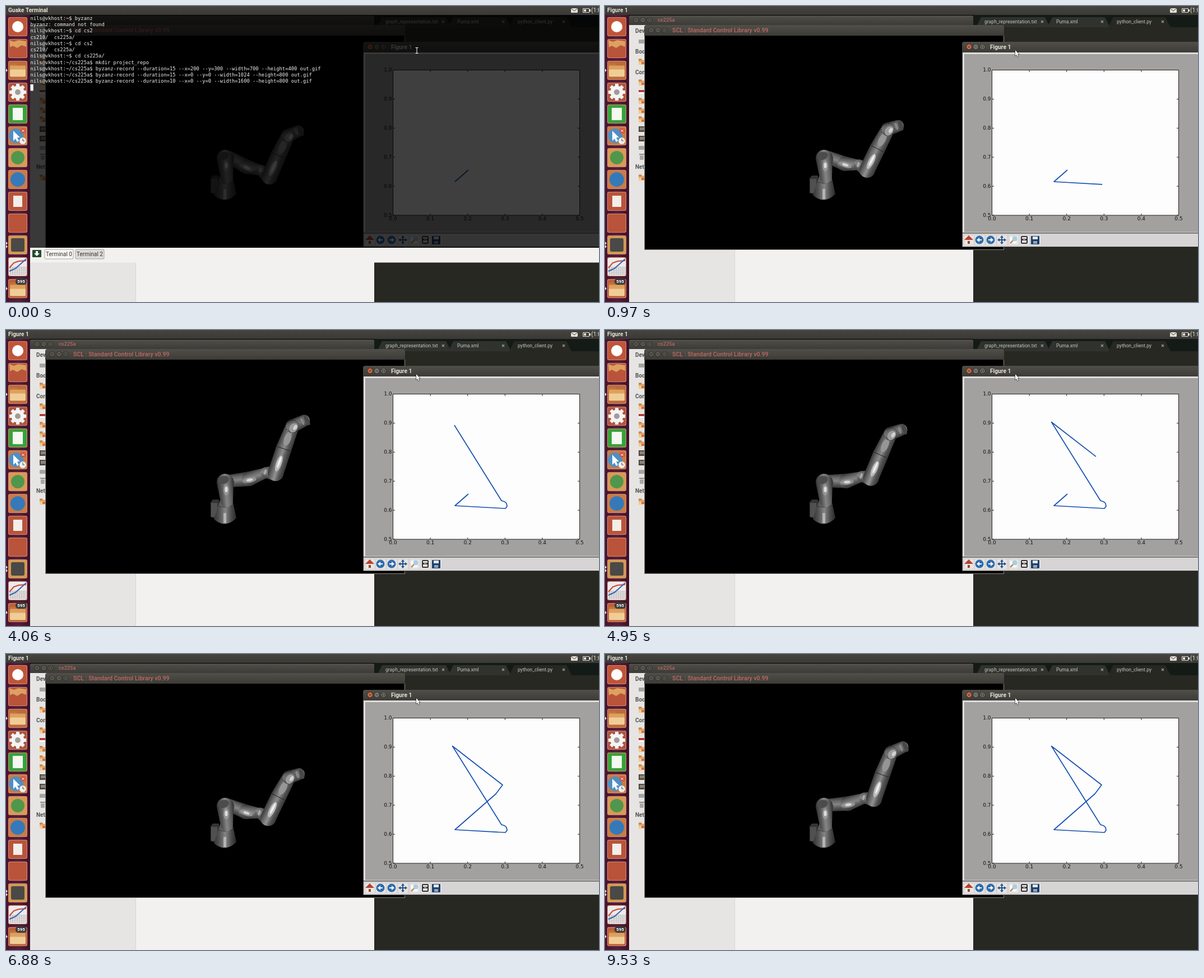
Animation, 1058 px wide and 529 px high, one loop 9630 ms. Source, as an HTML page with a canvas:

```html
<!DOCTYPE html>
<html lang="en">
<head>
<meta charset="utf-8">
<title>Robot arm and plot</title>
<style>
html, body { margin: 0; width: 100%; height: 100%; overflow: hidden; background: #000; }
canvas { display: block; }
</style>
</head>
<body>
<canvas id="stage" width="1058" height="529"></canvas>
<script>
const ctx = document.getElementById('stage').getContext('2d');
const LOOP = 9630, HIDE = 300, LAG = 250;
const UI = 'Roboto, "Open Sans", sans-serif';
const MONO = '8.79px "DejaVu Sans Mono", monospace';
const PLOT = '9px "DejaVu Sans", sans-serif';

// ---- drawing helpers ----
function box(c, x, y, w, h, r = 0) {
  ctx.fillStyle = c;
  ctx.beginPath();
  ctx.roundRect(x, y, w, h, r);
  ctx.fill();
}
function oval(c, x, y, rx, ry = rx, turn = 0) {
  ctx.fillStyle = c;
  ctx.beginPath();
  ctx.ellipse(x, y, rx, ry, turn, 0, 7);
  ctx.fill();
}
function trace(pts) {
  ctx.beginPath();
  pts.forEach(p => ctx.lineTo(p[0], p[1]));
}
function line(c, w, ...pts) {
  trace(pts);
  ctx.strokeStyle = c;
  ctx.lineWidth = w;
  ctx.stroke();
}
function poly(c, ...pts) {
  trace(pts);
  ctx.fillStyle = c;
  ctx.fill();
}
function say(s, x, y, font, c, align = 'left') {
  ctx.font = font;
  ctx.fillStyle = c;
  ctx.textAlign = align;
  ctx.fillText(s, x, y + 0.5);
}
function fade(x1, y1, x2, y2, ...colors) {
  const g = ctx.createLinearGradient(x1, y1, x2, y2);
  colors.forEach((c, i) => g.addColorStop(i / (colors.length - 1), c));
  return g;
}
const mix = (a, b, k) => [a[0] + (b[0] - a[0]) * k, a[1] + (b[1] - a[1]) * k];
const shift = (p, dx, dy) => [p[0] + dx, p[1] + dy];

// ---- motion: each leg eases exponentially towards its goal ----
const A = [825, 293], B = [801, 314], C = [891, 319], D = [884, 305], E = [796.5, 164.5], F = [886, 234];
const hook = [C, [894, 315], [893, 310], [890, 307], D];
const legs = [
  [0, 230, [B, C]], [1080, 500, hook], [3064, 230, [D, E]], [4200, 230, [E, F]],
  [5170, 230, [F, [874, 250], B]], [6180, 230, [B, C]], [7100, 500, hook], [9020, 230, [D, E]]
];
function partial(pts, k) {
  const len = i => Math.hypot(pts[i + 1][0] - pts[i][0], pts[i + 1][1] - pts[i][1]);
  let left = 0;
  for (let i = 0; i < pts.length - 1; i++) left += len(i);
  left *= k;
  const out = [pts[0]];
  for (let i = 0; i < pts.length - 1; i++) {
    const l = len(i);
    if (left <= l) return [...out, mix(pts[i], pts[i + 1], left / l)];
    out.push(pts[i + 1]);
    left -= l;
  }
  return out;
}
function trail(t) {
  const out = [A, B];
  legs.forEach(([start, tau, pts], i) => {
    if (t < start) return;
    const done = legs[i + 1] && t >= legs[i + 1][0];
    out.push(...(done ? pts : partial(pts, 1 - Math.exp((start - t) / tau))));
  });
  return out;
}

// ---- robot ----
function limb([x1, y1], r1, [x2, y2], r2, dark = '#333', light = '#858585') {
  const a = Math.atan2(y2 - y1, x2 - x1), nx = -Math.sin(a), ny = Math.cos(a), r = Math.max(r1, r2);
  ctx.fillStyle = fade(x1 + nx * r, y1 + ny * r, x1 - nx * r, y1 - ny * r, dark, '#555', light, '#666', dark);
  ctx.beginPath();
  ctx.arc(x1, y1, r1, a + Math.PI / 2, a - Math.PI / 2);
  ctx.arc(x2, y2, r2, a - Math.PI / 2, a + Math.PI / 2);
  ctx.fill();
}
function robot([px, py]) {
  const u = (px - 801) / 90, v = (314 - py) / 149;
  const pose = (x, y, ux, uy, vx, vy) => [x + ux * u + vx * v, y + uy * u + vy * v];
  const elbow = pose(470, 305, -2, -14, 11, -50);
  const wrist = pose(503, 232, 2, -14, 8, -61);
  const hand = pose(521, 224, 2, -12, 11, -63);
  const root = [398, 270];
  const mid = shift(mix(root, elbow, 0.43), 0, 2), neck = shift(mix(root, elbow, 0.8), 0, -4);
  const fore = shift(mix(elbow, wrist, 0.52), -1, 0);
  const tilt = Math.atan2(wrist[1] - elbow[1], wrist[0] - elbow[0]);
  const slope = Math.atan2(elbow[1] - root[1], elbow[0] - root[0]);
  const end = Math.atan2(hand[1] - wrist[1], hand[0] - wrist[0]);
  const spot = (c, p, rx, ry, a) => oval(c, p[0], p[1], rx, ry, a);

  // base and column
  poly('#343434', [365, 308], [369, 303], [380, 303], [380, 339], [365, 334]);
  box('#505050', 366, 309, 11, 25);
  ctx.fillStyle = fade(371, 0, 412, 0, '#343434', '#555', '#858585', '#4c4c4c', '#242424');
  ctx.beginPath();
  ctx.moveTo(382, 304);
  ctx.lineTo(404, 304);
  ctx.lineTo(411, 336);
  ctx.quadraticCurveTo(391, 356, 371, 338);
  ctx.fill();
  line('#343434', 1, [380, 315], [392, 317], [406, 314]);
  box('#b4b4b4', 388, 327, 5, 18);

  // links
  limb(root, 11, mid, 13);
  limb(mid, 13, neck, 9);
  limb([391, 272], 15, [394, 306], 11);
  oval('#4c4c4c', 388, 268, 10, 7, -0.3);
  oval('#969696', 393, 286, 5, 10);
  oval('#dedede', 393, 285, 2.5, 5);
  line('#343434', 1, [404, 264], [407, 272], [405, 281]);
  spot('#929292', shift(mid, 1, 2), 12, 5, slope);
  spot('#d6d6d6', shift(mid, 1, 2), 6, 2.5, slope);
  limb(neck, 10, elbow, 14);
  spot('#aaa', shift(neck, -2, -1), 2, 5, 0.3);

  // forearm
  limb(elbow, 14, fore, 14, '#363636', '#929292');
  limb(fore, 14, wrist, 12, '#363636', '#8c8c8c');
  spot('#bcbcbc', mix(elbow, fore, 0.4), 15, 5, tilt);
  spot('#efefef', mix(elbow, fore, 0.45), 11, 2, tilt);
  spot('#969696', mix(fore, wrist, 0.45), 13, 6, tilt);
  const nx = -Math.sin(tilt) * 13, ny = Math.cos(tilt) * 13;
  line('#202020', 1, shift(fore, nx, ny), shift(fore, -nx, -ny));

  // wrist and hand
  limb(wrist, 12, hand, 10.5, '#2e2e2e', '#747474');
  spot('#484848', shift(hand, 5, -1), 4, 10, end);
  spot('#888', mix(wrist, hand, 0.85), 2, 7, end);
  spot('#9c9c9c', shift(wrist, 2, 3), 7, 9, 0.6);
  spot('#d2d2d2', shift(wrist, 5, 2), 3, 5, 0.6);
  ctx.setLineDash([2, 2]);
  ctx.strokeStyle = '#111';
  ctx.lineWidth = 1;
  ctx.beginPath();
  ctx.ellipse(wrist[0], wrist[1], 12, 11, 0, 2.6, 6.2);
  ctx.stroke();
  ctx.setLineDash([]);
}

// ---- desktop ----
function folder(x, y, s) {
  box('#c2753a', x - 10 * s, y - 9 * s, 9 * s, 5 * s, s);
  box('#dda15f', x - 10 * s, y - 6 * s, 20 * s, 14 * s, s);
  box('#f0cd97', x - 10 * s, y - s, 20 * s, 9 * s, s);
}
const icons = [
  y => oval('#fff', 21, y, 10),
  y => poly('#dda15f', [6, y - 15], [14, y - 12], [22, y - 15], [36, y - 13], [36, y - 3], [28, y - 6], [20, y - 1], [12, y - 5], [7, y - 2]),
  y => folder(21, y, 1.4),
  y => {
    for (let i = 0; i < 8; i++) {
      const a = i * Math.PI / 4;
      line('#f4f4f4', 6, [21, y], [21 + 15 * Math.cos(a), y + 15 * Math.sin(a)]);
    }
    oval('#f4f4f4', 21, y, 11.5);
    oval('#a39b97', 21, y, 5);
  },
  y => box('#f4f8f0', 12, y - 11, 18, 22),
  y => {
    oval('#4e8fc4', 18, y, 13);
    poly('#fff', [13, y - 9], [13, y + 9], [17, y + 5], [20, y + 11], [23, y + 9], [20, y + 3], [25, y + 3]);
    oval('#f1eee8', 30, y + 9, 6);
    line('#444', 1, [30, y + 5], [30, y + 9], [33, y + 9]);
    box('#d94834', 26, y - 13, 9, 8, 2);
    line('#fff', 1, [28, y - 11], [33, y - 7]);
    line('#fff', 1, [33, y - 11], [28, y - 7]);
  },
  y => oval('#50964d', 21, y, 12),
  y => oval('#3579ba', 21, y, 13),
  y => box('#f4eee8', 13, y - 10, 16, 20),
  () => {},
  y => box('#4a4947', 9, y - 12, 24, 24, 3),
  y => {
    for (let i = 0; i < 5; i++) line('#aaa', 0.7, [6, y + 1 + i * 3], [36, y + 1 + i * 3]);
    for (let i = 0; i < 8; i++) line('#aaa', 0.7, [8 + i * 4, y], [8 + i * 4, y + 15]);
    line('#c94a33', 2, [6, y + 2], [14, y - 7], [23, y - 10], [36, y - 11]);
    line('#3465b4', 2, [6, y + 8], [17, y + 3], [26, y - 5], [36, y - 14]);
  },
  y => {
    folder(21, y + 2, 1.4);
    box('#3a3a3a', 17, y - 18, 20, 11, 5);
    say('595', 27, y - 12.5, `bold 8px ${UI}`, '#fff', 'center');
  }
];
const tiles = ['#bf5538', '#b9543b', '#bd6b3c', '#b0553f', '#37a339', '#c97c45', '#d89a55',
  '#c97c45', '#b9543b', '#b9543b', '#d19a52', '#eeeaea', '#bb6038'];

function launcher() {
  box(fade(0, 0, 43, 0, '#4a1430', '#56203a', '#3d1129'), 0, 16, 43, 513);
  tiles.forEach((c, i) => {
    const y = 37 + i * 39;
    box('#d58a70', 4, y - 17, 34, 34, 3);
    box(c, 5, y - 16, 32, 32, 3);
    icons[i](y);
  });
  for (const y of [115, 424, 430, 505]) poly('#ddd', [0, y - 3], [3, y], [0, y + 3]);
}
function titleBar(x, y, w, h, title, tx, color, font, active) {
  box(fade(0, y, 0, y + h, '#514f49', '#3c3b37'), x, y, w, h, [4, 4, 0, 0]);
  const cy = y + h / 2 - 0.5;
  for (let i = 0; i < 3; i++) {
    const cx = x + 12.5 + i * 12;
    oval('#2e2d2a', cx, cy, 5.3);
    oval(active && !i ? '#df6844' : active ? '#77756d' : '#595750', cx, cy, 4.4);
    if (i === 0) {
      line('#35342f', 1, [cx - 2, cy - 2], [cx + 2, cy + 2]);
      line('#35342f', 1, [cx + 2, cy - 2], [cx - 2, cy + 2]);
    } else if (i === 1) line('#35342f', 1, [cx - 2, cy], [cx + 2, cy]);
    else {
      ctx.strokeStyle = '#35342f';
      ctx.strokeRect(cx - 2, cy - 2, 4, 4);
    }
  }
  say(title, tx, cy, `${font} ${UI}`, color);
}
function editor() {
  box('#272822', 657, 16, 401, 513);
  box('#141b16', 657, 16, 401, 22);
  [[666, 'graph_representation.txt', 677, 780], [793, 'Puma.xml', 805, 887], [902, 'python_client.py', 913, 995]]
    .forEach(([x, name, tx, cross], i) => {
      const right = cross + 14;
      poly(i === 2 ? '#272822' : '#30322d', [x - 4, 38], [x + 5, 20], [right - 9, 20], [right, 38]);
      say(name, tx, 28, `8.64px ${UI}`, '#c5c5c0');
      line('#999', 1.2, [cross - 2, 26], [cross + 2, 30]);
      line('#999', 1.2, [cross + 2, 26], [cross - 2, 30]);
    });
}
function fileManager() {
  box('#f2f1f0', 43, 34, 614, 495);
  box('#e6e5e3', 43, 34, 188, 495);
  box('#d8d6d3', 231, 34, 1, 495);
  titleBar(43, 17, 614, 17, 'cs225a', 94, '#b76a62', '500 9.3px');
  [['Devices', 45], ['Bookmarks', 82], ['Computer', 119], ['Network', 288]]
    .forEach(([s, y]) => say(s, 54, y, `bold 10px ${UI}`, '#55524f'));
  [63, 100, 137, 153, 170, 187, 203, 220, 237, 253, 269, 307].forEach((y, i) => {
    if (i === 0 || i === 9) box('#a5a3a0', 60, y - 3, 12, 7, 1);
    else if (i === 3) { box('#fff', 60, y - 4, 12, 8); box('#b33f35', 60, y - 3, 12, 4); }
    else if (i === 7 || i === 8) { box('#53483f', 60, y - 5, 12, 10); box('#8b847c', 62, y - 3, 8, 5); }
    else if (i === 10) { box('#8c8a86', 61, y - 5, 9, 2); box('#aaa8a5', 62, y - 2, 7, 8, 1); }
    else { folder(66, y, 0.6); box('#d96c45', 65, y, 5, 4); }
  });
}
function toolbar() {
  const y = 418;
  box('#d6d4d4', 638, 407, 420, 22);
  [649, 668, 688, 708, 729, 748, 768].forEach(x => box('#e6e4e4', x - 8, y - 8, 17, 17, 1));
  box('#f1e7df', 644, y - 1, 10, 8);
  poly('#b5432f', [641, y], [649, y - 8], [657, y]);
  box('#8a4b30', 647, y + 2, 4, 5);
  for (const [x, d] of [[668, -1], [688, 1]]) {
    oval('#2f6dac', x, y, 7.5);
    line('#fff', 2, [x - 4 * d, y], [x + 3 * d, y]);
    poly('#fff', [x + 5 * d, y], [x, y - 4], [x, y + 4]);
  }
  line('#244f87', 2, [702, y], [714, y]);
  line('#244f87', 2, [708, y - 6], [708, y + 6]);
  for (let i = 0; i < 4; i++) {
    const c = Math.cos(i * Math.PI / 2), s = Math.sin(i * Math.PI / 2);
    poly('#244f87', [708 + 8 * c, y + 8 * s], [708 + 4 * c - 3 * s, y + 4 * s + 3 * c], [708 + 4 * c + 3 * s, y + 4 * s - 3 * c]);
  }
  box('#fff', 723, y - 5, 11, 11);
  line('#bd8a50', 2.5, [723, y + 6], [728, y + 1]);
  oval('#a9cde0', 731, y - 2, 4.5);
  box('#343434', 742, y - 7, 12, 14, 2);
  box('#e6e6e6', 744, y - 5, 8, 3);
  box('#e6e6e6', 744, y + 1, 8, 4);
  box('#fff', 746, y - 1, 4, 1);
  box('#203f68', 760, y - 7, 15, 15, 1);
  box('#e2e7ed', 763, y - 6, 9, 5);
  box('#8fa5bb', 764, y + 2, 7, 5);
}
function figure(t) {
  box('#3c3b37', 637, 74, 421, 357);
  titleBar(637, 64, 425, 19, 'Figure 1', 687, '#e4e0d8', 'bold 10.2px', true);
  box('#dedcdc', 638, 83, 420, 347);
  box('#a3a0a0', 641, 86, 417, 318);
  box('#55534f', 638, 405, 420, 1.5);
  box('#fdfdfd', 691, 115, 333, 259);
  ctx.strokeStyle = '#222';
  ctx.lineWidth = 1;
  ctx.strokeRect(690.5, 114.5, 333, 259.5);
  for (let i = 0; i < 6; i++) {
    const x = 690.5 + i * 66.6, y = 374 - i * 51.9;
    line('#222', 1, [x, 374], [x, 371]);
    line('#222', 1, [x, 115], [x, 118]);
    line('#222', 1, [691, y], [694, y]);
    line('#222', 1, [1023, y], [1020, y]);
    say((i / 10).toFixed(1), x, 380, PLOT, '#111', 'center');
    say((0.5 + i / 10).toFixed(1), 688.5, y, PLOT, '#111', 'right');
  }
  ctx.lineJoin = 'round';
  line('#1650b2', 1.7, ...trail(t - LAG));
  toolbar();
}
function topBar(title) {
  box(fade(0, 0, 0, 16, '#45443f', '#3a3935'), 0, 0, 1058, 16);
  say(title, 4, 7.5, `bold 10px ${UI}`, '#e4e0d8');
  box('#e4e0d8', 1008, 4, 12, 8, 1);
  line('#3c3b37', 1, [1008, 4], [1014, 9], [1020, 4]);
  ctx.strokeStyle = '#e4e0d8';
  ctx.strokeRect(1029.5, 4.5, 11, 7);
  box('#e4e0d8', 1041, 6, 2, 4);
  box('#e4e0d8', 1031, 6, 4, 4);
  say('(1:06)', 1044, 7.5, `10.5px ${UI}`, '#e4e0d8');
}

// ---- drop-down terminal ----
const home = 'nils@vkhost:~$ ', work = 'nils@vkhost:~/cs225a$ ';
const record = (d, x, y, w, h) =>
  `${work}byzanz-record --duration=${d} --x=${x} --y=${y} --width=${w} --height=${h} out.gif`;
const shell = [
  home + 'byzanz', 'byzanz: command not found',
  home + 'cd cs2', 'cs210/  cs225a/', home + 'cd cs2', 'cs210/  cs225a/',
  home + 'cd cs225a/', work + 'mkdir project_repo',
  record(15, 200, 300, 700, 400), record(15, 0, 0, 1024, 800), record(10, 0, 0, 1600, 800)
];
function terminal() {
  box('rgba(0,0,0,.75)', 43, 16, 1015, 416);
  shell.forEach((s, i) => say(s, 43.5, 22 + i * 11.25, MONO, '#f2f2f2'));
  box('#fff', 43.5, 140, 5.3, 11.5);
  box('#f2f1f0', 43, 432, 1015, 26.5);
  box('#244c2c', 47, 436, 16, 13, 1);
  poly('#fff', [53, 438], [57, 438], [57, 442], [60, 442], [55, 447], [50, 442], [53, 442]);
  [[69, 'Terminal 0', '#f7f6f5'], [124, 'Terminal 2', '#dedbd8']].forEach(([x, s, c]) => {
    box('#aaa6a1', x - 0.5, 434.5, 52, 18, 3);
    box(c, x + 0.5, 435.5, 50, 16, 2);
    say(s, x + 25.5, 443.5, `10px ${UI}`, '#333', 'center');
  });
  line('#fff', 1, [730.5, 74.5], [735.5, 74.5]);
  line('#fff', 1, [733, 75], [733, 84]);
  line('#fff', 1, [730.5, 84.5], [735.5, 84.5]);
}
function pointer() {
  const pts = [[732, 79], [732, 89], [734.2, 87], [736, 91], [737.5, 90], [736, 86.5], [738.8, 86.3]];
  line('#222', 1.2, ...pts, pts[0]);
  poly('#fff', ...pts);
}

function draw(t) {
  const covered = t < HIDE;
  ctx.textBaseline = 'middle';
  editor();
  fileManager();
  box('#8f8883', 70, 46, 642, 390);
  titleBar(70, 34, 642, 19, 'SCL : Standard Control Library v0.99', 120, '#c06a62', '500 10.6px');
  box('#000', 71, 53, 640, 382);
  robot(trail(t).pop());
  figure(t);
  if (covered) terminal();
  else pointer();
  topBar(covered ? 'Guake Terminal' : 'Figure 1');
  launcher();
}
function tick(now) {
  draw(now % LOOP);
  requestAnimationFrame(tick);
}
draw(0);
requestAnimationFrame(tick);
</script>
</body>
</html>
```
